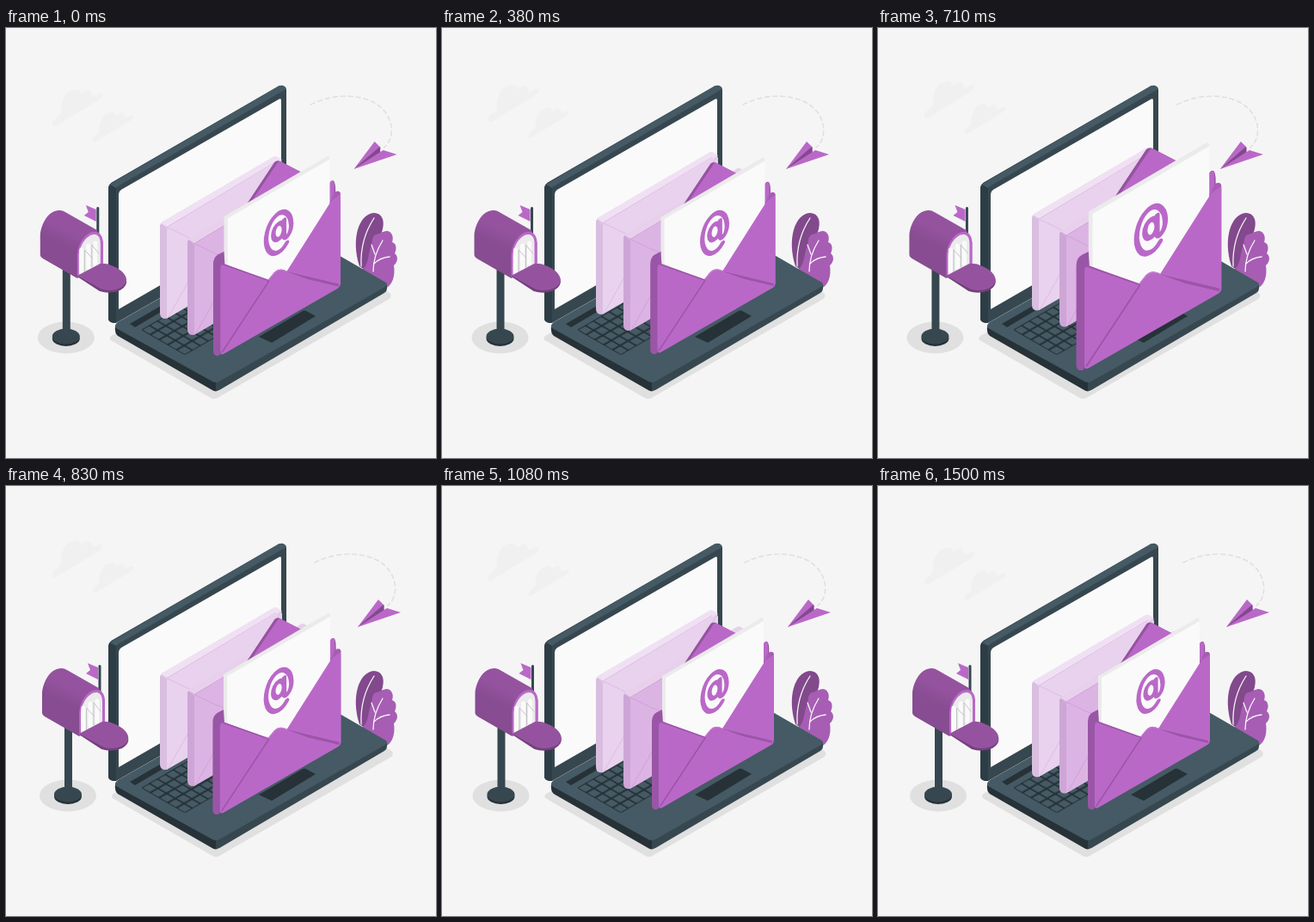
An HTML page that plays this animation: 500x500 px, repeating every 1.54 s.

```html
<!DOCTYPE html>
<html lang="en">
<head>
<meta charset="utf-8">
<title>Mail on a laptop</title>
<style>
  html, body { margin: 0; height: 100%; overflow: hidden; background: #f5f5f5; }
  svg { display: block; width: 100%; height: 100%; }
  .line { fill: none; stroke-linecap: round; stroke-linejoin: round; }
</style>
</head>
<body>
<svg viewBox="0 0 500 500">
  <defs>
    <pattern id="keys" width="9.2" height="10.2" patternUnits="userSpaceOnUse">
      <rect x="1" y="1" width="7.4" height="8.2" rx="1" fill="#455a64"/>
    </pattern>
    <linearGradient id="roof" x1="75" y1="222" x2="58" y2="258" gradientUnits="userSpaceOnUse">
      <stop offset=".3" stop-color="#95539f"/>
      <stop offset=".8" stop-color="#874c91"/>
    </linearGradient>
    <path id="cloud" d="M54 111C53 107 60 106 64 99C63 88 68 74 77 73C83 70 87 73 88 78C92 70 100 71 101 80L110 76C114 77 112 81 108 84L59 114Q53 117 54 111Z"/>
    <!-- closed envelope; strip, top, front and seam colours come from CSS variables -->
    <g id="envelope">
      <path fill="var(--strip)" d="M179 231Q179 228 182 227L188 231V338Q179 340 179 332Z"/>
      <path fill="var(--top)" d="M180 228Q180 226 183 225L311 150Q313 149 315 150L321 154L187 233Z"/>
      <path fill="var(--front)" d="M187 236Q187 232 190 230L318 155Q321 154 321 158V261L191 336Q187 338 187 338Z"/>
      <path fill="none" stroke="var(--seam)" stroke-width=".8" d="M180 228L187 232L314 156M187 232L212 244L245 256Q253 257 258 250L319 156M189 336L214 292L242 252M320 260L262 248"/>
    </g>
  </defs>

  <g id="clouds" fill="#f0f0f0">
    <use href="#cloud"/>
    <use href="#cloud" transform="translate(57 40) scale(.81)"/>
  </g>

  <g id="plane">
    <path class="line" stroke="#e0e0e0" stroke-width="1.6" stroke-dasharray="5 4" d="M355 89C385 74 420 77 437 93C451 106 453 128 440 139"/>
    <path fill="#ba68c8" d="M405 164L429 132L436 139L435 146Z"/>
    <path fill="#82498c" d="M405 164L435 138L436 147Z"/>
    <path fill="#ba68c8" d="M405 164L439 142L455 147Z"/>
  </g>

  <path fill="#82498c" d="M411 277C401 246 410 216 428 215C444 216 440 238 430 250L424 286Z"/>
  <path fill="#a75db4" d="M414 281C422 275 421 262 424 255C427 250 424 243 430 240C434 240 438 236 443 236C449 237 451 243 449 249C455 251 454 258 452 262C457 266 455 273 451 276C453 289 449 299 441 303Z"/>
  <path class="line" stroke="#f5f5f5" stroke-width="1.3" d="M413 277C412 254 418 236 428 221M427 283C427 266 433 255 438 247M429 263L425 252M428 274Q435 267 446 266"/>

  <path id="shadow" fill="#e0e0e0" d="M122 363Q119 360 124 357L240 300L420 290L446 308Q450 311 446 315L248 429Q243 433 238 430Z"/>

  <g>
    <path fill="#37474f" d="M119 187Q119 182 123 179.500L317 67.500Q321 66 324 68Q326 69 326 72V230L128 343Q119 343 119 338Z"/>
    <path fill="#455a64" d="M120 182.500L317 67.500Q321 66 325 69L324 72L130 184Q128 186 127 187Z"/>
    <path fill="#2d3d46" d="M119 187Q119 184 121 182L128 186V343Q119 343 119 338Z"/>
    <path fill="#fafafa" d="M131 193Q131 190 134 188L317 83Q320 81 320 84V218L131 327Z"/>
    <path fill="#263238" d="M127 346L244 411V422.500Q241 422 238 420L130 358Q126 355 127 346Z"/>
    <path fill="#37474f" d="M244 411L443 298V303Q443 306 440 308L249 420.500Q246 422 244 422.500Z"/>
    <path fill="#455a64" d="M128 349Q125 346 130 342L325 231Q328 230 331 232L441 295.500Q445 298 441 301L248 411Q244 413 240 411Z"/>
    <path fill="#263238" d="M144 344L244 286L250 289L150 348Z"/>
    <g transform="matrix(1 -.577 1 .577 157 351)">
      <rect width="146" height="51" rx="2" fill="#263238"/>
      <rect width="146" height="51" fill="url(#keys)"/>
    </g>
    <path fill="#263238" d="M294 359L345 329Q347 328 349 329L360 335L309 366Z"/>
  </g>

  <g id="closed">
    <use href="#envelope" style="--strip:#d9bee0;--top:#f0e0f3;--front:#e9d2ee;--seam:#dab6e1"/>
    <use href="#envelope" x="32" y="19" style="--strip:#cda6d5;--top:#e8d0ec;--front:#dcb4e4;--seam:#cd9bd7"/>
  </g>

  <g id="open">
    <path fill="#95539f" d="M282 206L312.500 160Q316 157 320 160L372 187Q376 178 379 182Q381 186 380 198L320 290Z"/>
    <path fill="#ba68c8" d="M286 205L315 162Q317 158 320 160L372 187Q376 178 379 183V198L320 280Z"/>
    <path fill="#ebebeb" d="M256 221L372 153Q374 154 374 157L300 250L260 290L256 285Z"/>
    <path fill="#fafafa" d="M260 223L374 157V235L310 300L260 290Z"/>
    <path class="line" transform="matrix(1 -.577 0 1 317 237.500)" stroke="#ba68c8" stroke-width="5.2" d="M9 18A14 21.500 0 1 1 14 0C14 11 6 15 6 7V-9M6 0A6 8.500 0 1 1 -6 0A6 8.500 0 1 1 6 0"/>
    <path fill="#9a56a6" d="M244 274Q244 266 250 263L256 260L257 276L252 374Q251 377 247 376Q244 375 244 371Z"/>
    <path fill="#ba68c8" d="M252 280Q252 273 257 274L305 292L312 283Q318 277 326 282L376 203Q379 194 384 193Q386 194 386 199V296Q386 299 383 301L256 374Q252 376 252 372Z"/>
    <path fill="#a75db4" d="M376 203Q378 191 384 193Q386 194 386 196Z"/>
    <path fill="#9b55a7" d="M325 282L384 296V299L350 291Z"/>
    <path class="line" stroke="#9b55a7" stroke-width="1.5" d="M254 372L306 293M254 274L305 292"/>
    <path class="line" stroke="#c77fd2" stroke-width="1" d="M306 291L312 284Q318 278 326 282"/>
  </g>

  <g id="mailbox">
    <ellipse cx="70" cy="360" rx="33" ry="18.5" fill="#e0e0e0"/>
    <ellipse cx="70" cy="361" rx="16" ry="9" fill="#263238"/>
    <ellipse cx="70" cy="358.5" rx="16" ry="9" fill="#37474f"/>
    <path fill="#37474f" d="M66 275H75V357Q70 361 66 357Z"/>
    <path fill="#ba68c8" d="M93 206L105 211V225L91 218L96 214Z"/>
    <path fill="#37474f" d="M105.500 209Q107 207 108.500 209V250H105.500Z"/>
    <path fill="url(#roof)" d="M40 241C41 226 51 211 63 212Q66 212 69 214L106 235L113 249V273L83 291L43 268Q40 266 40 264Z"/>
    <path fill="#ba68c8" d="M83 291V264C84 249 94 237 103 237C110 237 113 243 113 250V274Z"/>
    <path fill="#ebebeb" d="M85 288V264C86 251 95 240 103 240C108 240 110 245 110 251V274Z"/>
    <path class="line" stroke="#fafafa" stroke-width="5" d="M88 284V258M96 279V253M104 274V250"/>
    <path class="line" stroke="#c4c4c4" stroke-width="1" d="M91.500 284V258L100 267M100 278V252L108 262"/>
    <path fill="#74407d" d="M83 289L110 275L140 292Q142 300 133 305Q121 310 109 306Z"/>
    <path fill="#95539f" d="M83 288L110 274Q117 273 125 277C135 281 142 289 140 295C138 303 122 308 110 303Z"/>
  </g>
</svg>

<script>
  const LOOP = 1540, CYCLE = 1500, LEAD = 31;

  // keyframes as [percent, value] pairs
  const beat = [[0, 1], [10, 1.2], [30, 1], [40, 1], [50, 1.2], [60, 1], [100, 1]];
  const drift = [[0, 0], [50, -10], [100, 0]];
  const shake = [[0, 0], [10, -1], [20, 2], [30, -4], [40, 4], [50, -4],
                 [60, 4], [70, -4], [80, 2], [90, -1], [100, 0]];

  function valueAt(keys, percent) {
    const i = Math.max(1, keys.findIndex(([p]) => p >= percent));
    const [p0, v0] = keys[i - 1], [p1, v1] = keys[i];
    return v0 + (v1 - v0) * (percent - p0) / (p1 - p0);
  }

  const place = (id, transform) =>
    document.getElementById(id).setAttribute('transform', transform);

  function draw() {
    const time = performance.now() % LOOP;
    const percent = Math.min(time + LEAD, CYCLE) / CYCLE * 100;
    const x = valueAt(shake, percent), y = valueAt(drift, percent);
    place('clouds', `translate(0 ${y})`);
    place('closed', `translate(0 ${y})`);
    place('plane', `translate(${2 * x} 0)`);
    place('mailbox', `translate(${x} 0)`);
    place('shadow', `translate(${x} 0)`);
    place('open', `translate(315 260.5) scale(${valueAt(beat, percent)}) translate(-315 -260.5)`);
    requestAnimationFrame(draw);
  }
  draw();
</script>
</body>
</html>
```
